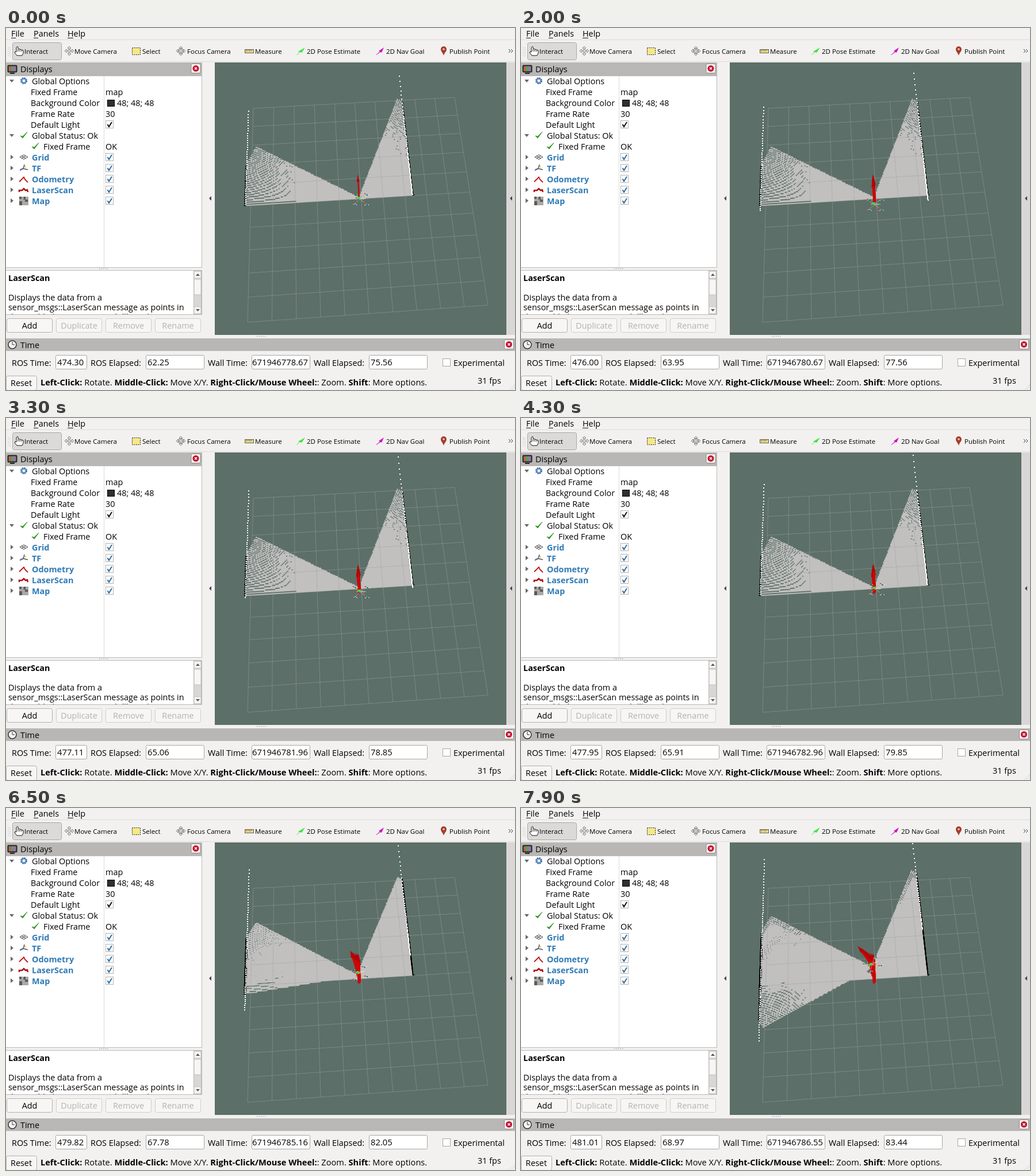
Recreate the animation shown at these times as an HTML page with a canvas. Size 885 px wide and 631 px high, loop 8 s.

```html
<!DOCTYPE html>
<html lang="en">
<head>
<meta charset="utf-8">
<title>Laser scan viewer</title>
<style>
html, body { margin: 0; width: 100%; height: 100%; overflow: hidden; background: #f2f1f0; }
svg, canvas { position: absolute; left: 0; top: 0; }
canvas { left: 363px; top: 60px; }
text { font: 14.4px "Open Sans", "Noto Sans", sans-serif; fill: #000; white-space: pre; }
.tool text { font-size: 11.5px; }
.num text { font-size: 14.8px; }
.hint { font-size: 14.6px; }
.b { font-weight: bold; }
.blue { font-weight: bold; fill: #2f7ab5; }
.off text { fill: #b5b2ae; }
.mid text { text-anchor: middle; }
.box { fill: #fff; stroke: #aaa6a2; }
.btn { fill: #f7f6f5; stroke: #b3afab; }
.off .btn { stroke: #d0cdca; }
.line { fill: none; stroke: #333; }
</style>
</head>
<body>
<svg width="885" height="631" viewBox="0 0 885 631">
  <defs>
    <g id="close">
      <rect x=".5" y=".5" width="16" height="16" rx="2" fill="#f7f6f5" stroke="#8d8a87"/>
      <circle cx="8.5" cy="8.5" r="5.5" fill="#c4122f"/>
      <path d="M6.5 6.5l4 4m0-4l-4 4" stroke="#fff" stroke-width="1.4"/>
    </g>
    <g id="check">
      <rect x=".5" y=".5" width="13" height="13" fill="#fff" stroke="#b5b2ae"/>
      <path d="M3.5 7l2.5 4 5-8" fill="none" stroke="currentColor" stroke-width="2"/>
    </g>
    <path id="tick" d="M1 8l4 4 8-11-8 8z" fill="#3c9a2e" stroke="#3c9a2e"/>
    <path id="closed" d="M0 0l5 4-5 4z" fill="#6b6966"/>
    <path id="open" d="M0 0h8l-4 5z" fill="#6b6966"/>
    <path id="cross" d="M0-8l3 3h-2v4h4v-2l3 3-3 3v-2h-4v4h2l-3 3-3-3h2v-4h-4v2l-3-3 3-3v2h4v-4h-2z" fill="#eee" stroke="#777" stroke-width=".9"/>
    <path id="dots" d="M0 0h17" stroke="#b0adaa" stroke-width="1.5" stroke-dasharray="1.5 2"/>
    <clipPath id="help"><rect x="1" y="424" width="324" height="75"/></clipPath>
  </defs>

  <g>
    <text x="9" y="15">File</text><text x="48" y="15">Panels</text><text x="107" y="15">Help</text>
    <path d="M9 17.5h8M48 17.5h8M107 17.5h10" stroke="#111"/>
    <path d="M0 20.5h885M0 58.5h885" stroke="#dedcda"/>
    <path d="M4 33v16M7 34v16" stroke="#bbb8b5" stroke-dasharray="1.5 2"/>
  </g>

  <g class="tool">
    <rect x="11.5" y="25.5" width="85" height="30" rx="3" fill="#dcdad8" stroke="#aaa7a4"/>
    <path d="M18 34v8l-2-1-1 2 4 5h9l2-4v-5l-3-1-3-1-3-1v-3q-1.5-2-3 1z" fill="#fff" stroke="#111"/>
    <path d="M21 37v4m3-3v3m3-2v2" stroke="#111"/>
    <use href="#cross" x="110" y="40"/>
    <rect x="219.5" y="34.5" width="14" height="12" fill="#f5e888" stroke="#222" stroke-dasharray="2 1.5"/>
    <use href="#cross" x="304" y="40"/><circle cx="304" cy="40" r="4.5" fill="none" stroke="#777"/>
    <rect x="415.5" y="37.5" width="15" height="6" fill="#ead98f" stroke="#665f43"/>
    <path d="M418 38v3m3-3v2m3-2v3m3-3v2" stroke="#665f43"/>
    <path d="M505 47l5-5-2-1 12-7-6 9-3-1-5 5z" fill="#3de63d"/>
    <path d="M643 47l7-6-2-1 9-6-4 9-2-1-7 5z" fill="#d112c4"/>
    <path d="M761 48c-2-6-5-7-5-11a5 5 0 0 1 10 0c0 4-3 5-5 11z" fill="#a73b2a"/><circle cx="761" cy="37" r="1.8" fill="#e8c9c3"/>
    <text x="32" y="45">Interact</text><text x="119" y="45">Move Camera</text>
    <text x="237" y="45">Select</text><text x="315" y="45">Focus Camera</text>
    <text x="433" y="45">Measure</text><text x="523" y="45">2D Pose Estimate</text>
    <text x="661" y="45">2D Nav Goal</text><text x="771" y="45">Publish Point</text>
    <path d="M874 37l3 3-3 3m4-6l3 3-3 3" class="line"/>
  </g>

  <g>
    <rect y="60" width="341" height="23" fill="#b9b7b5"/>
    <rect x="3.5" y="65.5" width="15" height="11" rx="1" fill="#58a05c" stroke="#222" stroke-width="2"/>
    <path d="M5 67h4v8h-4z" fill="#c85a5a"/><path d="M13 67h4v8h-4z" fill="#a86ab8"/><path d="M7 79h8" stroke="#222" stroke-width="2"/>
    <text x="25" y="77">Displays</text>
    <use href="#close" x="321.5" y="62"/>
    <rect x="-.5" y="83.5" width="341" height="334" fill="#fff" stroke="#bdbab7"/>
    <path d="M170.5 84v333" stroke="#dcdad8"/>
    <g id="tree" color="#2f6da3"></g>
    <circle cx="31" cy="92" r="4.5" fill="#9cbbe0" stroke="#3f6ea5" stroke-width="3" stroke-dasharray="2.5 1"/><circle cx="31" cy="92" r="2" fill="#fff"/>
    <use href="#tick" x="24" y="180"/><use href="#tick" x="44" y="199"/>
    <rect x="176.5" y="125.5" width="12" height="11" fill="#303030" stroke="#000"/>
    <use href="#check" x="173" y="161" color="#111"/>
    <path d="M24 225l7-4 7 4-7 4zm3-2l7 4m-7 0l7-4" fill="none" stroke="#444"/>
    <path d="M24 248l6-3 2-7m-2 7l8 2" fill="none" stroke="#555" stroke-width="1.5"/><path d="M32 240l2 3" stroke="#d8b82c" stroke-width="2"/><path d="M25 247l5-2" stroke="#4770b0" stroke-width="2"/>
    <path d="M23 268l8-8 2 4 5 5" fill="none" stroke="#c31212" stroke-width="1.8"/>
    <path d="M23 286v-3h5l3-3 3 3 3-1 1 4" fill="none" stroke="#b01010" stroke-width="2.5"/>
    <path d="M23 294h16v15h-16z" fill="#aaa9a7"/><path d="M23 294h4v4h-4zm8 0h3v5h4v4h-5v-4h-3zm-8 8h5v7h-5z" fill="#5c5b59"/>
    <use href="#dots" x="162" y="419.5"/>
  </g>

  <g>
    <rect x="-.5" y="422.5" width="341" height="77" fill="#fff" stroke="#bdbab7"/>
    <g clip-path="url(#help)">
      <text x="4" y="441" class="b">LaserScan</text>
      <text x="4" y="475">Displays the data from a</text>
      <text x="4" y="492">sensor_msgs::LaserScan message as points in</text>
      <text x="4" y="509">the world, drawn as points, billboards,</text>
    </g>
    <rect x="326.5" y="423.5" width="13" height="75" fill="#d9d7d5" stroke="#bdbab7"/>
    <path d="M327 424h12v12h-12zm0 14h12v27h-12zm0 48h12v12h-12z" fill="#f7f6f5" stroke="#c4c1be"/>
    <path d="M330 432h7l-3.5-4zm0 58h7l-3.5 4z" fill="#555"/>
    <g id="buttons" class="mid"></g>
    <rect x="870" y="60" width="15" height="475" fill="#d9d7d5"/>
    <path d="M357 293v8l-4-4zM880 293v8l-4-4z" fill="#444"/>
    <use href="#dots" x="436" y="537.5"/>
  </g>

  <g>
    <rect y="541" width="885" height="22" fill="#b9b7b5"/>
    <circle cx="11" cy="552" r="7" fill="#f4f4f4" stroke="#333" stroke-width="1.5"/><path d="M11 547v5h4" class="line"/>
    <text x="25" y="558">Time</text><use href="#close" x="866" y="543"/>
    <text x="10" y="589">ROS Time:</text><text x="147" y="589">ROS Elapsed:</text>
    <text x="351" y="589">Wall Time:</text><text x="535" y="589">Wall Elapsed:</text>
    <g class="num">
      <rect class="box" x="86.5" y="570.5" width="54" height="24" rx="2"/><text id="ros" x="89" y="588"/>
      <rect class="box" x="243.5" y="570.5" width="101" height="24" rx="2"/><text id="rosRun" x="246" y="588"/>
      <rect class="box" x="427.5" y="570.5" width="101" height="24" rx="2"/><text id="wall" x="428" y="588"/>
      <rect class="box" x="631.5" y="570.5" width="101" height="24" rx="2"/><text id="wallRun" x="634" y="588"/>
    </g>
    <rect class="box" x="759.5" y="576.5" width="13" height="13"/><text x="778" y="589">Experimental</text>
    <rect class="btn" x=".5" y="606.5" width="53" height="25" rx="3"/><text x="8" y="624">Reset</text>
    <text class="hint" x="60" y="623"><tspan class="b">Left-Click:</tspan> Rotate. <tspan class="b">Middle-Click:</tspan> Move X/Y. <tspan class="b">Right-Click/Mouse Wheel:</tspan>: Zoom. <tspan class="b">Shift</tspan>: More options.</text>
    <text x="820" y="620">31 fps</text>
    <path d="M884 622l-9 9m9-5l-5 5" stroke="#bbb8b5" stroke-dasharray="1.5 2"/>
  </g>
</svg>
<canvas id="view" width="507" height="475"></canvas>
<script>
const $ = id => document.getElementById(id);

const label = (x, y, text, cls = '') => `<text x="${x}" y="${y}" class="${cls}">${text}</text>`;
const icon = (id, x, y) => `<use href="#${id}" x="${x}" y="${y}"/>`;

// Tree rows: indent, name, value
$('tree').innerHTML = [
  [45, 'Global Options'], [43, 'Fixed Frame', 'map'], [43, 'Background Color', '48; 48; 48'],
  [43, 'Frame Rate', '30'], [43, 'Default Light'], [45, 'Global Status: Ok'], [65, 'Fixed Frame', 'OK'],
  [45, 'Grid'], [45, 'TF'], [45, 'Odometry'], [45, 'LaserScan'], [45, 'Map']
].map(([x, name, value = ''], i) => {
  const y = 98 + 19 * i, display = i > 6;
  return label(x, y, name, display ? 'blue' : '') + label(i === 2 ? 193 : 173, y, value) +
    (display ? icon('closed', 8, y - 10) + icon('check', 173, y - 13) : '') +
    (name.startsWith('Global') ? icon('open', 6, y - 8) : '');
}).join('');

$('buttons').innerHTML = ['Add', 'Duplicate', 'Remove', 'Rename'].map((name, i) =>
  `<g class="${i ? 'off' : ''}"><rect class="btn" x="${1.5 + 86 * i}" y="506.5" width="79" height="24" rx="3"/>` +
  label(41 + 86 * i, 524, name) + '</g>').join('');

// World units: the ground grid is the unit square, one grid square is 0.1
const BG = '#5c6f68', RAD = Math.PI / 180;
const LEFT_WALL = -.023, RIGHT_WALL = .735;
const CELL = .005, MAP_RANGE = .55, HIT_RANGE = .6;

const c = $('view').getContext('2d');
c.translate(-363, -60);

// Perspective of the ground plane
function project(u, v) {
  const w = 1 + .01671 * u - .165 * v;
  return [(430 + 363.03 * u - 79.3 * v) / w, (140 - 16.98 * u + 288.35 * v) / w];
}

// Back up a little, then drive forward while turning left
function poseAt(t) {
  const drive = Math.max(0, t - 4) / 3.9;
  return {
    u: .491 + .004 * Math.sin(2 * t) - .01 * drive,
    v: .495 + .026 * Math.sin(Math.PI * Math.min(t, 4) / 4) - .068 * drive ** 2,
    yaw: Math.max(0, t - 5.2) * 12
  };
}

// One ray per degree over the front half circle, ending on the side walls
function castRays({ u, yaw }) {
  const rays = [];
  for (const side of [-1, 1]) {
    const gap = side < 0 ? u - LEFT_WALL : RIGHT_WALL - u;
    for (let a = side * yaw; a < 89; a++) {
      const cos = Math.cos(a * RAD);
      rays.push({ dx: side * cos, dy: -Math.sin(a * RAD), dist: gap / cos });
    }
  }
  return rays;
}

function addCell(path, u, v) {
  const i = Math.floor(u / CELL), j = Math.floor(v / CELL);
  path.cells.add(i + ',' + j);
}

function cellPath(cells) {
  const path = new Path2D();
  for (const key of cells) {
    const [i, j] = key.split(',').map(Number);
    [[0, 0], [1, 0], [1, 1], [0, 1]].forEach(([a, b], k) =>
      path[k ? 'lineTo' : 'moveTo'](...project((i + a) * CELL, (j + b) * CELL)));
    path.closePath();
  }
  return path;
}

// Cells crossed by the rays are free, cells at their ends are occupied
function mapScan(time) {
  const pose = poseAt(time), free = new Set(), wall = new Set();
  const mark = (set, ray, r) => set.add(
    Math.floor((pose.u + ray.dx * r) / CELL) + ',' + Math.floor((pose.v + ray.dy * r) / CELL));
  for (const ray of castRays(pose)) {
    if (ray.dist > HIT_RANGE) continue;
    for (let r = 0; r < Math.min(ray.dist, MAP_RANGE); r += CELL / 2) mark(free, ray, r);
    if (ray.dist < MAP_RANGE) for (const r of [0, CELL]) mark(wall, ray, ray.dist + r);
  }
  return { time, free: cellPath(free), wall: cellPath(wall) };
}
const scans = [0, 5.5, 5.6, 5.7, 7.4].map(mapScan);

function drawMap(t) {
  const known = scans.filter(s => s.time <= t);
  c.fillStyle = '#c1c0bf';
  known.forEach(s => c.fill(s.free));
  c.fillStyle = '#000';
  known.forEach(s => c.fill(s.wall));
}

function line(x1, y1, x2, y2, color, width) {
  c.strokeStyle = color;
  c.lineWidth = width;
  c.beginPath();
  c.moveTo(x1, y1);
  c.lineTo(x2, y2);
  c.stroke();
}

function drawGrid() {
  const color = 'rgba(160,160,164,.5)';
  for (let k = 0; k < 1.05; k += .1) {
    line(...project(k, 0), ...project(k, 1), color, 1);
    line(...project(0, k), ...project(1, k), color, 1);
  }
}

// Around 1.2 s the scan is briefly shown turned against the map
function drawScan(t, pose) {
  const lag = 6 * RAD * Math.exp(-(((t - 1.2) / .3) ** 2));
  const range = .71 + .07 * Math.min(1, t / 4), cos = Math.cos(lag), sin = Math.sin(lag);
  c.fillStyle = '#fff';
  for (const { dx, dy, dist } of castRays(pose)) {
    if (dist > range) continue;
    const [x, y] = project(pose.u + dist * (dx * cos + dy * sin), pose.v + dist * (dy * cos - dx * sin));
    c.fillRect(Math.round(x) - 1, Math.round(y) - 1, 2, 2);
  }
}

function drawArrow({ u, v, yaw }) {
  const [x1, y1] = project(u, v);
  const [x2, y2] = project(u - .115 * Math.sin(yaw * RAD), v - .115 * Math.cos(yaw * RAD));
  const len = Math.hypot(x2 - x1, y2 - y1), dx = (x2 - x1) / len, dy = (y2 - y1) / len;
  const hx = x2 - dx * 13, hy = y2 - dy * 13;
  line(x1, y1, hx, hy, '#cc0808', 2.5);
  c.fillStyle = '#b50505';
  c.beginPath();
  c.moveTo(x2, y2);
  c.lineTo(hx - dy * 2.5, hy + dx * 2.5);
  c.lineTo(hx + dy * 2.5, hy - dx * 2.5);
  c.fill();
}

function random(seed) {
  return () => (seed = (seed * 16807) % 2147483647) / 2147483647;
}

// Small axes with an illegibly small name beside them
function drawFrame(x, y, width, rnd) {
  c.fillStyle = '#fff';
  for (let i = 0; i < width; i++)
    if (rnd() < .75) c.fillRect(Math.round(x + i - 2), Math.round(y + rnd() * 2 - 1), 1, 1);
  ['#e03030', '#30d840', '#2c45c8'].forEach((color, i) => {
    c.fillStyle = color;
    c.fillRect(x - 2 + i * 2, y - 2 + i, 2, 2);
  });
}

function drawRobot({ u, v, yaw }) {
  const rnd = random(41), [x, y] = project(u, v);
  c.save();
  c.translate(x, y);
  c.rotate(-yaw * RAD);
  for (const dx of [-10, 11]) for (const dy of [-6, 11]) drawFrame(dx, dy, 9, rnd);
  drawFrame(-4, 1, 18, rnd);
  line(-8, -4, 9, 8, '#d8c84a', .7);
  line(9, -5, -7, 9, '#d88aa0', .7);
  c.fillStyle = '#35e045';
  c.fillRect(-3, -2, 5, 4);
  c.restore();
}

function draw(t) {
  const pose = poseAt(t);
  c.fillStyle = BG;
  c.fillRect(363, 60, 507, 475);
  drawMap(t);
  drawGrid();
  drawScan(t, pose);
  for (let past = 0; past <= t; past += .2) drawArrow(poseAt(past));
  drawRobot(pose);

  const ros = .85 * t, wall = .998 * t;
  $('ros').textContent = (474.3 + ros).toFixed(2);
  $('rosRun').textContent = (62.25 + ros).toFixed(2);
  $('wall').textContent = '671946' + (778.67 + wall).toFixed(2);
  $('wallRun').textContent = (75.56 + wall).toFixed(2);
}

let shown = -1;
function tick() {
  let step = Math.floor(performance.now() % 8000 / 100);
  if (step === 26) step = 25; // the view stalls here briefly
  if (step !== shown) draw((shown = step) / 10);
  requestAnimationFrame(tick);
}
tick();
</script>
</body>
</html>
```
